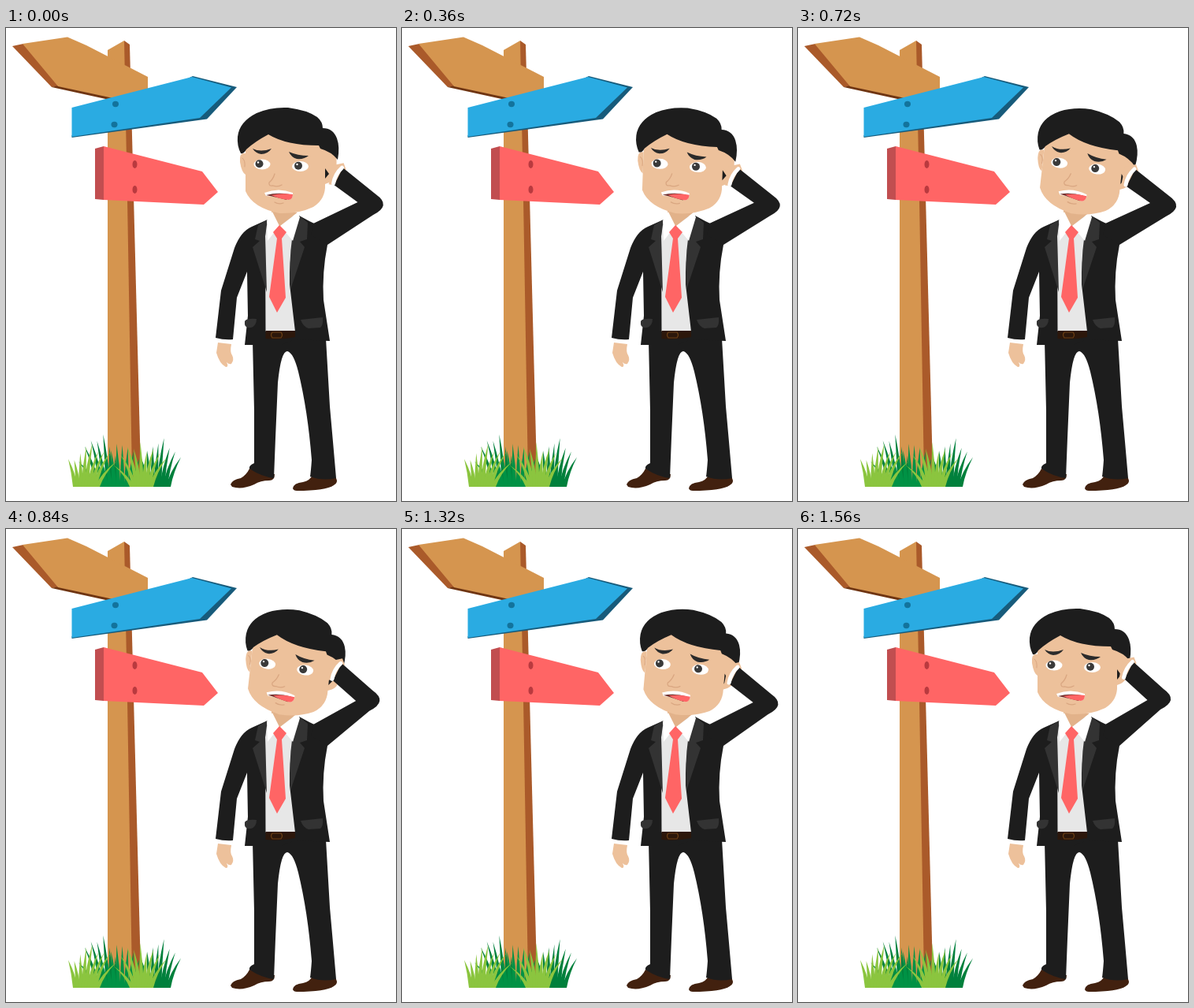
Write an HTML page with a canvas that moves like this. It is 495 px wide and 600 px high and loops after 1680 ms.

```html
<!DOCTYPE html>
<html lang="en">
<head>
<meta charset="utf-8">
<title>Which way?</title>
<style>
html, body { margin: 0; width: 100%; height: 100%; overflow: hidden; background: #fff; }
canvas { display: block; width: 495px; height: 600px; }
</style>
</head>
<body>
<canvas id="stage" width="495" height="600"></canvas>
<script>
const ctx = document.getElementById('stage').getContext('2d');
const STEP = 120;
const STEPS = 14;
const SWINGS = 5;
const GROUND = 582;
const SKIN = '#edc19b', SUIT = '#1d1d1d', LAPEL = '#333', CREASE = '#d9a681';
const RED = '#ff6565', WOOD = '#d5954f', BARK = '#aa5a2a', LEATHER = '#42210f';

const lerp = (a, b, u) => a + (b - a) * u;

function smooth(from, to, t) {
  const u = Math.min(1, Math.max(0, (t - from) / (to - from)));
  return u * u * (3 - 2 * u);
}

function seeded(seed) {
  return () => (seed = (seed * 16807) % 2147483647) / 2147483647;
}

function fill(color, d) {
  ctx.fillStyle = color;
  ctx.fill(new Path2D(d));
}

function line(color, width, d) {
  ctx.strokeStyle = color;
  ctx.lineWidth = width;
  ctx.lineCap = 'round';
  ctx.stroke(new Path2D(d));
}

function oval(color, x, y, rx, ry = rx) {
  ctx.fillStyle = color;
  ctx.beginPath();
  ctx.ellipse(x, y, rx, ry, 0, 0, Math.PI * 2);
  ctx.fill();
}

function drawSigns() {
  fill(BARK, 'M150 16 L157 21 L171 560 L167 582 H150 Z');
  fill(WOOD, 'M129 28 L150 16 L154 218 L160 570 L158 582 H129 Z');

  fill(BARK, 'M8 23 L22 20 L67 74 L58 75 Z');
  fill('#6f3512', 'M58 75 L67 73 L140 87 L131 91 Z');
  fill(WOOD, 'M21 20 L78 11.5 L102 22 L180 62 V82 L136 89 L66 74 Z');

  fill('#175b7b', 'M83.5 136 L237 61 L293 75 L255 115.5 L83.5 139 Z');
  fill('#2aabe2', 'M83.5 101 L236 62 L286 75.5 L246 114 L83.5 138 Z');
  oval('#13739c', 139, 96.5, 4, 3.7);
  oval('#13739c', 137.5, 122.5, 4, 3.7);

  fill('#c14e50', 'M113 153 L124 150 V218 L113 217 Z');
  fill(RED, 'M124 150 L249 182 L269 208 L251 224 L124 218 Z');
  oval('#b93a3f', 163.5, 173, 3, 5);
  oval('#b93a3f', 163.5, 205, 3, 5);
}

// Blades rise from one stretch of ground and fan out to another at their tips.
function drawTuft(color, [baseFrom, baseTo], [tipFrom, tipTo], tall, count, random) {
  for (let i = 0; i < count; i++) {
    const u = i / (count - 1);
    const base = lerp(baseFrom, baseTo, u);
    const tip = lerp(tipFrom, tipTo, u);
    const height = tall * (0.45 + 0.35 * Math.sin(Math.PI * u) + 0.2 * random());
    const bend = lerp(base, tip, 0.25);
    const knee = GROUND - height * 0.5;
    fill(color, `M${tip} ${GROUND - height} Q${bend + 2.5} ${knee} ${base + 3} ${GROUND}
      H${base - 3} Q${bend - 2.5} ${knee} ${tip} ${GROUND - height} Z`);
  }
}

function drawGrass() {
  const random = seeded(11);
  drawTuft('#00803c', [112, 138], [92, 139], 72, 7, random);
  drawTuft('#00803c', [178, 206], [172, 222], 66, 8, random);
  drawTuft('#009245', [122, 168], [112, 176], 58, 10, random);
  drawTuft('#8bc53f', [88, 116], [79, 140], 58, 9, random);
  drawTuft('#8bc53f', [160, 184], [137, 204], 58, 9, random);
}

function drawBody() {
  fill(LEATHER, 'M285 579 Q287 573 298 571 Q305 567 309 559 L341 566 Q341 574 334 574 Q323 574 315 579 Q299 586 287 582 Z');
  fill(LEATHER, 'M364 584 Q365 577 377 576 Q386 574 389 567 L419 571 Q422 577 416 580 Q406 587 369 587 Q365 587 364 584 Z');
  fill(SUIT, 'M313 396 L315 485 L315 552 Q308 555 309 559 Q324 569 340 571 L342 520 L345 450 Q349 410 357 410 Q365 412 371 436 Q383 485 388 548 Q387 562 386 569 Q402 575 419 571 L415 525 L411 480 L406 394 Z');

  fill(SKIN, 'M269 399 L286 401 Q284 411 287 415 Q290 421 286 426 Q283 427 280 424 Q283 430 279 430 Q271 426 267 412 Z');
  fill(SUIT, 'M332 243 L312 252 Q298 258 290 279 L273 333 L266 393 Q277 396 288 395 L293 342 L306 309 L307 365 L303 402 H350 L366 395 L411 397 L403 345 Q401 310 408 275 L409 258 Q397 250 385 245 L372 238 Z');
  fill('#e7e7e7', 'M330 250 L349 247 L366 262 Q359 295 360 325 L367 385 H329.5 L329 264 Z');
  fill('#2c170b', 'M329.5 384 H367 V392 Q349 396 329.5 394 Z');
  line('#6b3f14', 1.2, 'M338 386 H349 Q352 389 349 393 H338 Q335 389 338 386 Z');

  fill(LAPEL, 'M332 243 L320 250 L316 268 L322 270 L313 278 L331 335 L329 264 Z');
  fill(LAPEL, 'M372 238 L383 247 L382 268 L373 271 L379 278 L361 332 Q359 295 363 268 Z');
  fill(LAPEL, 'M303 372 Q305 368 318 369 Q318 378 311 380 Q304 381 303 376 Z');
  fill(LAPEL, 'M374 370 L402 367 Q403 377 399 380 L384 381 Q377 379 374 370 Z');

  fill('#e2b28a', 'M337 229 L370 234 L348 252 L337 240 Z');
  fill('#fff', 'M338 233 L331 244 L332 270 L347 251 Z');
  fill('#fff', 'M370 234 L348 251 L364 270 L373 240 Z');
  fill(RED, 'M347 250 L356 259 L350 267 L355 342 L344 361 L334 341 L344 267 L339 259 Z');
}

function drawEye(x, y, pupilX) {
  oval('#fff', x, y, 10.5, 6.5);
  oval('#3a3a3a', pupilX, y - 0.7, 5);
  oval('#fff', pupilX - 1.5, y - 2.5, 1.2);
}

function drawHead(tilt) {
  ctx.save();
  ctx.translate(345, 232);
  ctx.rotate(0.112 * tilt);
  ctx.translate(-345, -232);

  fill(SKIN, 'M304 159 Q296 157 297 170 Q299 183 304 186 Z');
  line(CREASE, 1, 'M300 165 Q304 168 303 176');
  fill(SKIN, 'M304 150 L333 125 L398 140 L419 160 Q422 190 410 196 L405 198 Q406 217 390 227 Q371 236 347 235 Q313 228 304 207 Z');
  fill(SUIT, 'M405 178 L410 185 L405 191 Z');
  fill(SUIT, 'M298 159 Q293 149 294 138 Q296 119 318 108 Q336 100 358 101 Q382 104 395 113 Q402 119 402 127 Q415 127 420 140 Q424 151 421 167 Q413 157 399 153 L397 149 Q356 149 333 135 Q316 144 305 154 Q302 160 298 159 Z');

  fill('#2b2b2b', 'M313 153 Q323 158 337 153 Q332 160 324 160 Q317 159 313 153 Z');
  fill('#2b2b2b', 'M359 157 Q370 162 384 162 Q378 167 369 166 Q362 164 359 157 Z');
  drawEye(325, 173, 321.5);
  drawEye(373.5, 175.5, 371);

  line(CREASE, 1.3, 'M341 185 Q339 192 334 196 Q333 201 339 200 Q345 202 350 199');
  fill('#fff', 'M328 209 Q346 202 364 209 Q365 216 359 218 Q348 214 330 213 Z');
  fill('#71312c', 'M330 212 Q345 208 360 211 L356 218 Q345 215 330 212 Z');
  fill(RED, 'M337 212 Q350 209 364 211 Q364 217 359 218 Q347 217 337 212 Z');
  line(CREASE, 1.3, 'M341 221 Q346 224 352 222');
  ctx.restore();
}

// Points are given for the lowered arm; raising it shifts elbow and wrist.
function drawArm(swing) {
  const lift = 1 - swing;
  const elbow = (x, y, share = 1) => `${x - 7 * lift * share} ${y - 10 * lift * share}`;
  const wrist = (x, y) => `${x - 2.5 * lift} ${y - 10.5 * lift}`;

  fill(SKIN, `M${wrist(415, 176)} L${wrist(429, 173)} L${wrist(432, 181)} L${wrist(417, 201)} L${wrist(410, 200)} Z`);
  fill(SUIT, `M${wrist(428, 179)} L${elbow(471, 213)} Q${elbow(491, 227)} ${elbow(467, 239)}
    L408 275 L387 263 L390 248 L${elbow(447, 222, 0.5)} L${wrist(417, 201)} Z`);
  line('#fff', 5, `M${wrist(427, 179)} Q${wrist(418, 187)} ${wrist(416, 199)}`);
}

function render(now) {
  const step = Math.floor(now / STEP) % STEPS;
  const tilt = smooth(1.5, 5.5, step) - smooth(10.2, 13, step);
  const swing = 0.5 + 0.5 * Math.cos(2 * Math.PI * SWINGS * step / STEPS - 0.87);

  ctx.fillStyle = '#fff';
  ctx.fillRect(0, 0, 495, 600);
  drawSigns();
  drawGrass();
  drawBody();
  drawHead(tilt);
  drawArm(swing);
}

function tick() {
  render(performance.now());
  requestAnimationFrame(tick);
}
tick();
</script>
</body>
</html>
```
